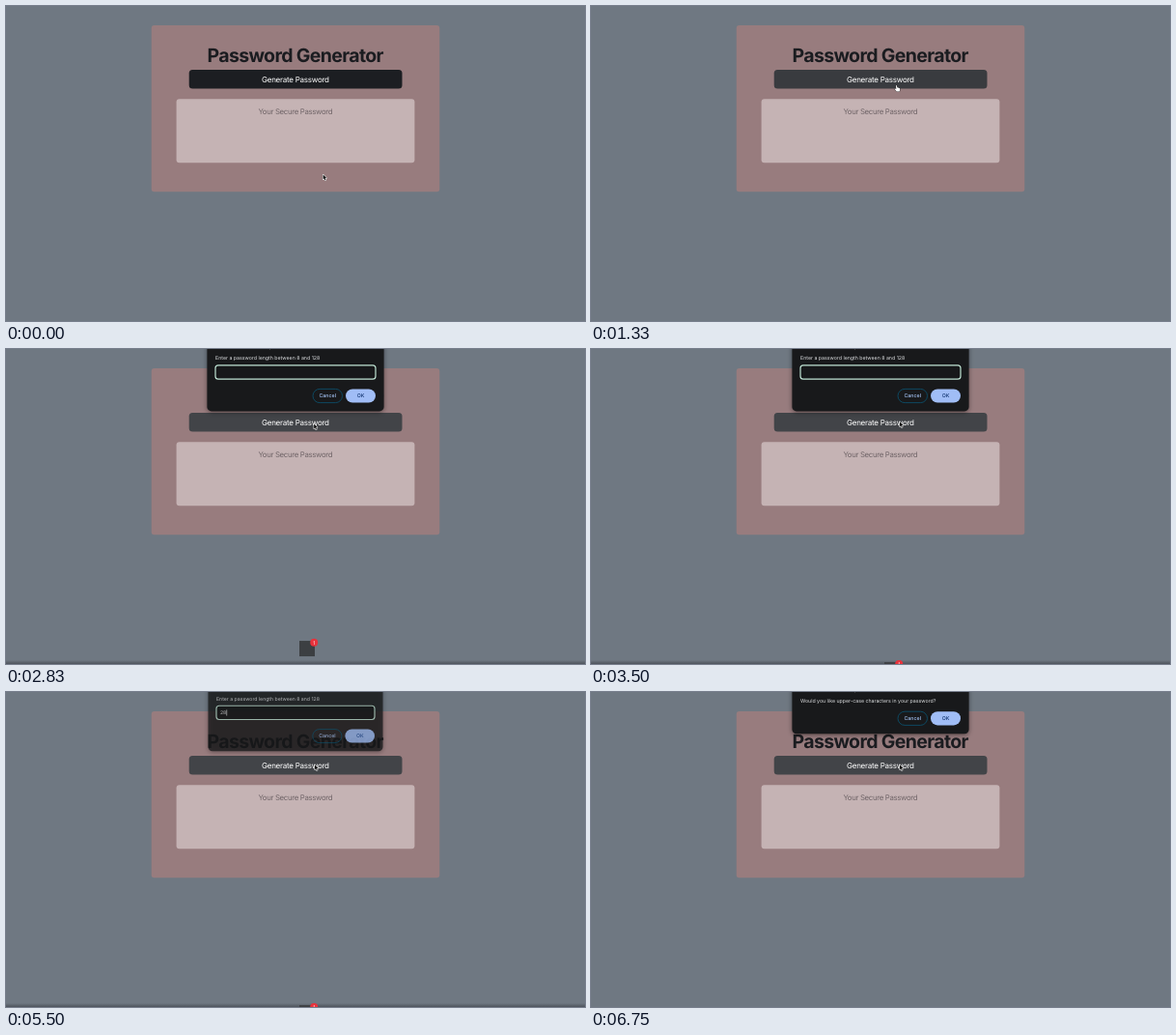
Animation of 600x326 px, one loop 8 s. Source, as an HTML page with a canvas:

```html
<!DOCTYPE html>
<html lang="en">
<head>
<meta charset="utf-8">
<title>Password Generator</title>
<style>
  html, body { margin: 0; width: 100%; height: 100%; overflow: hidden; background: #6f7882; }
  canvas { display: block; width: 600px; height: 326px; }
</style>
</head>
<body>
<canvas id="stage"></canvas>
<script>
const W = 600, H = 326, LOOP = 8000;
const canvas = document.getElementById('stage');
const ctx = canvas.getContext('2d');
const dpr = window.devicePixelRatio || 1;
canvas.width = W * dpr;
canvas.height = H * dpr;

const clamp = v => Math.max(0, Math.min(1, v));
const span = (t, a, b) => clamp((t - a) / (b - a));
const smooth = p => p * p * (3 - 2 * p);
const easeOut = p => 1 - (1 - p) ** 3;
const mix = (a, b, p) => a + (b - a) * p;

function box(x, y, w, h, r, fill, stroke, line = 1) {
  ctx.beginPath();
  ctx.roundRect(x, y, w, h, r);
  if (fill) { ctx.fillStyle = fill; ctx.fill(); }
  if (stroke) { ctx.strokeStyle = stroke; ctx.lineWidth = line; ctx.stroke(); }
}

function text(str, x, y, size, color, { weight = 400, align = 'left', track = 0 } = {}) {
  ctx.font = `${weight} ${size}px Inter, Roboto, sans-serif`;
  ctx.textRendering = 'geometricPrecision';
  ctx.letterSpacing = track + 'px';
  ctx.textAlign = align;
  ctx.fillStyle = color;
  // trailing tracking shifts centred text, so nudge it back
  ctx.fillText(str, align === 'center' ? x + track / 2 : x, y);
}

function drawPage(t) {
  ctx.fillStyle = '#6f7882';
  ctx.fillRect(0, 0, W, H);
  box(150.7, 20, 298.6, 172.3, 3, '#987c7e');
  text('Password Generator', 300, 58.2, 19.5, '#1b1c20', { weight: 700, align: 'center', track: -0.65 });

  const hover = span(t, 800, 950), focus = span(t, 1500, 1650);
  const shade = c => Math.round(mix(c, mix(c + 29, c + 38, focus), hover));
  box(189.7, 66, 220.8, 19.6, 3.6, `rgb(${shade(28)},${shade(30)},${shade(34)})`);
  text('Generate Password', 300, 78.9, 8, '#fff', { align: 'center', track: -0.25 });

  box(176.6, 96.3, 246.8, 66, 3, '#c5b3b4');
  text('Your Secure Password', 300, 112, 7.8, '#706568', { align: 'center', track: -0.33 });
}

function pill(label, x, y, w, fill, stroke, color) {
  box(x, y, w, 14.2, 7.1, fill, stroke, 0.8);
  text(label, x + w / 2, y + 9, 5.3, color, { weight: 500, align: 'center' });
}

function caretOn(t) {
  if (t < 4420) return t >= 1750 && Math.floor(t / 500) % 2 === 0 || t >= 1750 && t < 2500;
  return t < 5000 || t >= 5500;
}

function drawField(t) {
  box(217, 16.8, 166, 14.4, 3, '#17181a', '#bfe3d3', 1.2);
  const typed = t < 4420 ? '' : t < 4500 ? '2' : '28';
  text(typed, 221, 25.9, 5.2, '#e6e7e8');
  if (caretOn(t)) {
    ctx.fillStyle = '#f0f2f2';
    ctx.fillRect(221.2 + 3.2 * typed.length, 21, 0.7, 6.2);
  }
}

// shown: 0 hidden, 1 fully open
function drawDialog(shown, message, bottom, field) {
  if (shown <= 0) return;
  ctx.save();
  const scale = mix(0.95, 1, shown);
  ctx.translate(300, -10 * (1 - shown));
  ctx.scale(scale, scale);
  ctx.translate(-300, 0);
  ctx.globalAlpha = shown;

  ctx.save();
  ctx.shadowColor = 'rgba(0,0,0,0.45)';
  ctx.shadowBlur = 5 * dpr;
  ctx.shadowOffsetY = dpr;
  box(208.4, -40, 183.2, 40 + bottom, 4.5, '#18191b');
  ctx.restore();

  text('says', 266, -1, 6, '#e6e7e8', { weight: 500 });
  text(message, 217, 11.4, 5.24, '#dfe1e3');
  if (field) field();
  const y = bottom - 23;
  pill('Cancel', 318, y, 30.5, null, '#0b5573', '#a8c7fa');
  pill('OK', 352, y, 31, '#a0bdf6', null, '#10336f');
  ctx.restore();
}

function drawDock(t) {
  const u = (t - 2650) % 2000;
  if (t < 2650 || t > 5750) return;
  const glow = span(u, 0, 150) * (1 - span(u, 880, 1040));
  const edge = ctx.createLinearGradient(0, 322, 0, 326);
  edge.addColorStop(0, 'rgba(50,54,62,0)');
  edge.addColorStop(1, `rgba(50,54,62,${0.55 * glow})`);
  ctx.fillStyle = edge;
  ctx.fillRect(0, 322, W, 4);

  const p = u / 880;
  if (p >= 1) return;
  const top = 329.5 - 42 * 4 * p * (1 - p);
  box(304, top, 16, 16, 0, '#3c3f42');
  box(315.2, top - 2.2, 8, 8, 4, '#e8323c');
  text('1', 319.2, top + 3.7, 5, '#fff', { align: 'center' });
}

function cursorAt(t) {
  if (t < 1100) {
    const p = smooth(span(t, 300, 1100));
    return [mix(328.2, 299, p), mix(174, 76, p)];
  }
  if (t < 2600) {
    const p = smooth(span(t, 1100, 1350));
    return [mix(299, 316.8, p), mix(76, 82, p)];
  }
  const p = smooth(span(t, 2620, 2950));
  return [mix(316.8, 319.6, p), mix(82, 74.8, p)];
}

function shape(points, fill, stroke, line) {
  ctx.beginPath();
  points.forEach(([x, y]) => ctx.lineTo(x, y));
  ctx.closePath();
  ctx.lineJoin = 'round';
  ctx.strokeStyle = stroke;
  ctx.lineWidth = line;
  ctx.stroke();
  ctx.fillStyle = fill;
  ctx.fill();
}

const ARROW = [[0.4, 0.5], [0.4, 5.5], [1.5, 4.5], [2.3, 6.4], [3.2, 6], [2.4, 4.2], [3.9, 4.1]];
const HAND = [[-0.5, 0.4], [0.4, 0.4], [0.8, 2.4], [3.2, 3], [3.7, 4], [3.2, 6.6],
  [0.3, 6.6], [-1.8, 4.2], [-1.2, 3.6], [-0.2, 4.2]];

function drawCursor(t) {
  const [x, y] = cursorAt(t);
  const hand = t > 800 && t < 1520;
  ctx.save();
  ctx.translate(x, y);
  if (hand) shape(HAND, '#fff', '#222', 0.8);
  else shape(ARROW, '#111', '#f4f4f4', 1.1);
  ctx.restore();
}

function draw(t) {
  ctx.setTransform(dpr, 0, 0, dpr, 0, 0);
  drawPage(t);
  drawCursor(t);
  const prompt = easeOut(span(t, 1480, 1760)) * (1 - span(t, 5440, 5700));
  drawDialog(prompt, 'Enter a password length between 8 and 128', 64.4, () => drawField(t));
  drawDialog(easeOut(span(t, 5600, 5850)), 'Would you like upper-case characters in your password?', 43.2);
  drawDock(t);
}

const start = performance.now();
function tick() {
  draw((performance.now() - start) % LOOP);
  requestAnimationFrame(tick);
}
tick();
</script>
</body>
</html>
```
